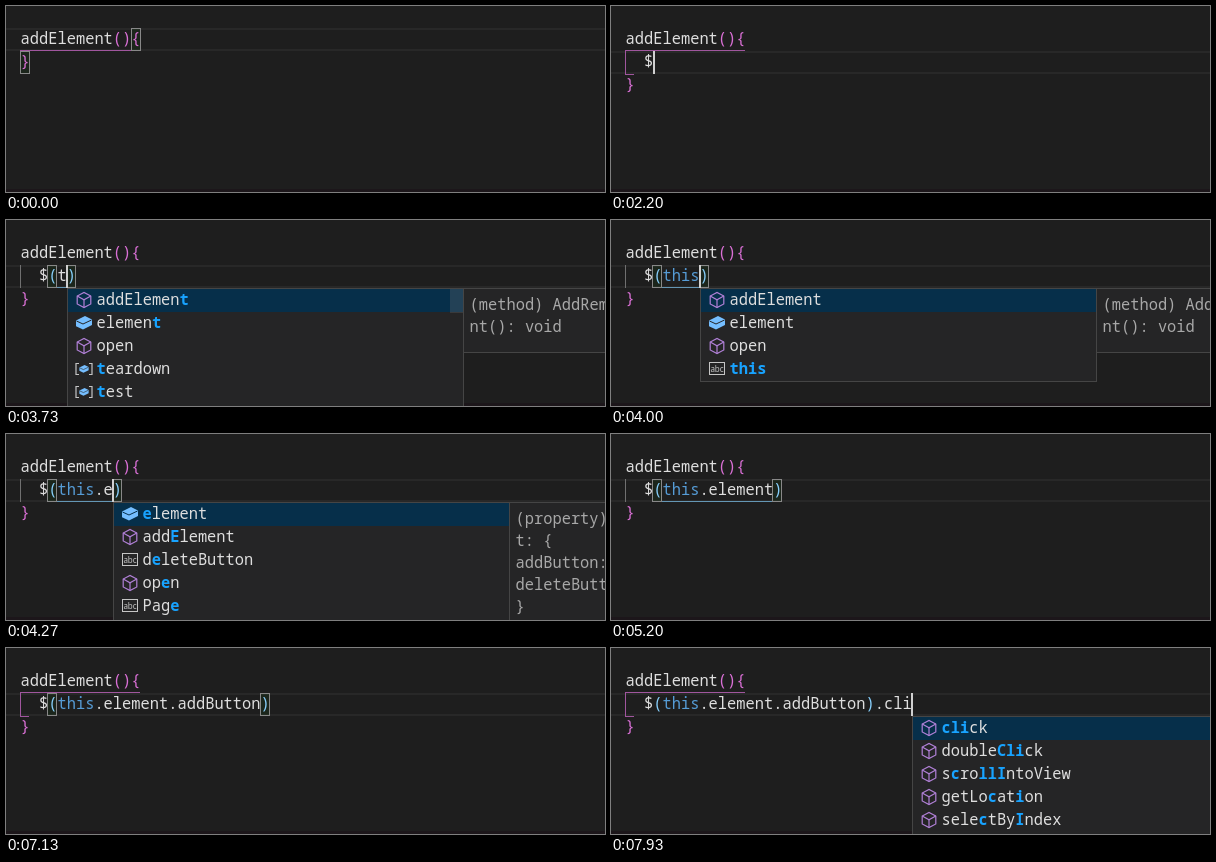
An HTML page with a canvas that plays this animation: 599 by 186 pixels, repeating every 8 s.

```html
<!DOCTYPE html>
<html lang="en">
<head>
<meta charset="utf-8">
<title>Editor typing</title>
<style>
  html, body { margin: 0; width: 599px; height: 186px; overflow: hidden; background: #1e1e1e; }
  canvas { display: block; }
</style>
</head>
<body>
<canvas id="stage" width="599" height="186"></canvas>
<script>
const ctx = document.getElementById('stage').getContext('2d');
const LOOP = 8000, W = 599, H = 186;
const LEFT = 14.55, PITCH = 9.23, ROW = 23, TOP = 22;
const FONT = '15.38px "Noto Sans Mono", "DejaVu Sans Mono", monospace';
const PLAIN = '#dedede', ORCHID = '#da70d6', SKY = '#87cefa', KEYWORD = '#569cd6';
const GUIDE = '#a0569e', SKY_GUIDE = '#6496b4', MATCH = '#18a3ff', PURPLE = '#b180d7', BLUE = '#75beff';

const colX = col => LEFT + col * PITCH;

// Item labels: first letter picks the icon, [..] marks matched letters.
const list = (items, details = [], scrollbar = false) => ({ items: items.split(' '), details, scrollbar });
const METHOD = ['(method) AddRemove.addEleme', 'nt(): void'];
const PROPERTY = ['(property) AddRemove.elemen', 't: {', 'addButton: string;', 'deleteButton: string;', '}'];
const BUTTON = ['(property) addButton: string'];
const ELEMENT = 'm:addElement f:element m:open';
const T_ITEMS = 'm:addElemen[t] f:elemen[t] m:open v:[t]eardown v:[t]est';

const events = [
  [0, { line: 0, text: null, match: 'brace', caret: null, purple: true, guide: false, popup: null }],
  [470, { caret: 13 }],
  [930, { caret: null }],
  [1330, { line: 1, text: '', match: null, caret: 2 }],
  [1530, { guide: true }],
  [1800, { caret: null }],
  [2200, { text: '$', caret: 3 }],
  [2270, { popup: list('m:[$] m:[$]$') }],
  [2330, { popup: list('m:[$] m:[$]$', ['function $(selector', '): Element']) }],
  [2730, { text: '$()', caret: 4 }],
  [2800, { popup: null }],
  [2930, { match: 'paren' }],
  [3200, { caret: null }],
  [3270, { purple: false }],
  [3600, { text: '$(t)', caret: 5 }],
  [3670, { popup: list(T_ITEMS, [], true) }],
  [3730, { popup: list(T_ITEMS, METHOD, true) }],
  [3800, { text: '$(th)', caret: 6, popup: list(ELEMENT + ' a:[th]is a:[th]row', METHOD) }],
  [3930, { text: '$(thi)', caret: 7, popup: list(ELEMENT + ' a:[thi]s', METHOD) }],
  [4000, { text: '$(this)', caret: 8, popup: list(ELEMENT + ' a:[this]', METHOD) }],
  [4130, { text: '$(this.)', caret: 9, popup: list(ELEMENT + ' a:addButton a:deleteButton', METHOD) }],
  [4270, { text: '$(this.e)', caret: 10, popup: list('f:[e]lement m:add[E]lement a:d[e]leteButton m:op[e]n a:Pag[e]', PROPERTY) }],
  [4400, { text: '$(this.el)', caret: 11 }],
  [4470, { popup: list('f:[el]ement m:add[El]ement a:d[el]eteButton', PROPERTY) }],
  [4530, { text: '$(this.ele)', caret: 12, popup: list('f:[ele]ment m:add[Ele]ment a:d[ele]teButton', PROPERTY) }],
  [4730, { text: '$(this.element)', caret: 16, popup: null }],
  [5200, { caret: null }],
  [5470, { text: '$(this.element.)', caret: 17, match: 'open' }],
  [5530, { popup: list('f:addButton f:deleteButton a:addElement a:element a:open', BUTTON) }],
  [5870, { match: 'paren' }],
  [6000, { caret: null }],
  [6270, { text: '$(this.element.addButton)', caret: 26, popup: null }],
  [6600, { caret: 27 }],
  [6670, { purple: true }],
  [7130, { caret: null }],
  [7530, { text: '$(this.element.addButton).', caret: 28, match: null, popup: list('m:$ m:$$ m:addCommand m:addValue m:clearValue m:click') }],
  [7670, { text: '$(this.element.addButton).c', caret: 29, popup: list('m:[c]learValue m:[c]lick m:doubleClick m:getComputed m:getCSS m:s') }],
  [7800, { text: '$(this.element.addButton).cl', caret: 30, popup: list('m:[cl]earValue m:[cl]ick m:double[Cl]ick m:s[c]rol[l]IntoView m:isClickable m:s') }],
  [7930, { text: '$(this.element.addButton).cli', caret: 31, popup: list('m:[cli]ck m:double[Cli]ck m:s[c]ro[ll][I]ntoView m:getLo[c]at[i]on m:sele[c]tBy[I]ndex m:selectByName') }],
];

function stateAt(time) {
  return Object.assign({}, ...events.filter(e => e[0] <= time).map(e => e[1]));
}

function rect(x, y, w, h, color) {
  ctx.fillStyle = color;
  ctx.fillRect(x, y, w, h);
}

function outline(x, y, w, h, color) {
  ctx.strokeStyle = color;
  ctx.lineWidth = 1;
  ctx.strokeRect(x + 0.5, y + 0.5, w - 1, h - 1);
}

function write(str, x, baseline, color, weight = 500) {
  ctx.font = `${weight} ${FONT}`;
  ctx.fillStyle = color;
  for (const ch of str) {
    ctx.fillText(ch, x, baseline);
    x += PITCH;
  }
  return x;
}

function path(points, color, fill, width = 1.2) {
  ctx.beginPath();
  points.forEach(([x, y], i) => i ? ctx.lineTo(x, y) : ctx.moveTo(x, y));
  if (fill) {
    ctx.closePath();
    ctx.fillStyle = color;
    ctx.fill();
  } else {
    ctx.strokeStyle = color;
    ctx.lineWidth = width;
    ctx.stroke();
  }
}

function slab(scale, bg) {
  ctx.save();
  ctx.scale(scale, scale);
  path([[-8, -2.5], [1, -7], [8, -3.5], [8, 2], [-1, 6.5], [-8, 3.2]], BLUE, true);
  path([[-7.5, -2], [-1, 1], [7.5, -3]], bg, false, 1);
  ctx.restore();
}

const icons = {
  m() {
    path([[0, -7.5], [6.8, -4], [6.8, 4], [0, 7.5], [-6.8, 4], [-6.8, -4], [0, -7.5], [6.8, -4]], PURPLE);
    path([[-6.8, -4], [0, -0.3], [6.8, -4]], PURPLE);
    path([[0, -0.3], [0, 7.5]], PURPLE);
  },
  f(bg) { slab(1, bg); },
  v(bg) {
    for (const s of [-1, 1]) path([[s * 5, -5.5], [s * 8, -5.5], [s * 8, 5.5], [s * 5, 5.5]], '#c5c5c5');
    slab(0.58, bg);
  },
  a() {
    outline(-8, -7, 16, 13, '#c5c5c5');
    ctx.font = '8px "Noto Sans", sans-serif';
    ctx.fillStyle = '#c5c5c5';
    ctx.textAlign = 'center';
    ctx.fillText('abc', 0, 2.5);
    ctx.textAlign = 'left';
  },
};

function drawItem(item, x, y, bg) {
  ctx.save();
  ctx.translate(x + 17, y + 11);
  icons[item[0]](bg);
  ctx.restore();
  let textX = x + 29.5;
  item.slice(2).split(/\[(.+?)\]/).forEach((part, i) => {
    textX = i % 2 ? write(part, textX, y + 16, MATCH, 700) : write(part, textX, y + 16, PLAIN);
  });
}

function drawPopup({ items, details, scrollbar }, x) {
  const y = 68, width = 397;
  if (details.length) {
    const dx = x + width - 1, height = Math.max(65, details.length * 22 + 21);
    rect(dx, y, W, height, '#252526');
    outline(dx, y, W, height, '#454545');
    details.forEach((text, i) => write(text, dx + 6.5, y + 22 + i * 22, '#a8a8a8'));
  }
  // Long lists run on below the stage.
  const height = items.length > 4 ? H : items.length * ROW + 2;
  rect(x, y, width, height, '#252526');
  rect(x + 1, y + 1, width - 2, ROW, '#062f4a');
  items.forEach((item, i) => drawItem(item, x, y + 1 + i * ROW, i ? '#252526' : '#062f4a'));
  if (scrollbar) rect(x + width - 14, y + 1, 13, 24, 'rgba(121, 121, 121, 0.25)');
  outline(x, y, width, height, '#454545');
}

function matchBox(line, col) {
  const x = Math.floor(colX(col) - 0.3), y = TOP + line * ROW;
  rect(x, y, 10, ROW, 'rgba(0, 100, 0, 0.1)');
  outline(x, y, 10, ROW, '#888888');
}

function drawCode(text) {
  let col = 2;
  for (const part of text.split(/(this|[()])/)) {
    const color = part === 'this' ? KEYWORD : /[()]/.test(part) ? SKY : PLAIN;
    write(part, colX(col), 61, color);
    col += part.length;
  }
}

function draw(time) {
  const s = stateAt(time);
  const open = s.text !== null;
  const closeCol = open ? 2 + s.text.indexOf(')') : 0;
  rect(0, 0, W, H, '#1e1e1e');
  rect(0, 183, W, 3, '#1c161a');

  const lineY = TOP + s.line * ROW;
  rect(0, lineY, W, 2, '#282828');
  rect(0, lineY + ROW - 2, W, 2, '#282828');

  if (s.purple) {
    rect(14, 44, 120, 1, GUIDE);
    if (open) rect(14, 68, 9, 1, GUIDE);
  } else {
    const from = Math.floor(colX(3));
    rect(from, 67, Math.floor(colX(closeCol + 1)) - from, 1, SKY_GUIDE);
  }
  if (s.guide) rect(14, 45, 1, ROW, s.purple ? GUIDE : '#707070');

  if (s.match === 'brace') {
    matchBox(0, 12);
    matchBox(1, 0);
  } else if (s.match) {
    matchBox(1, 3);
    if (s.match === 'paren') matchBox(1, closeCol);
  }

  write('(){', write('addElement', LEFT, 38, PLAIN), 38, ORCHID);
  write('}', LEFT, open ? 84 : 61, ORCHID);
  if (open) drawCode(s.text);

  if (s.popup) drawPopup(s.popup, Math.ceil(colX(s.caret ?? closeCol)));
  if (s.caret !== null) rect(Math.floor(colX(s.caret)), lineY, 2, ROW, '#d0d0d0');
}

const start = performance.now();
function tick() {
  draw((performance.now() - start) % LOOP);
  requestAnimationFrame(tick);
}
tick();
</script>
</body>
</html>
```
